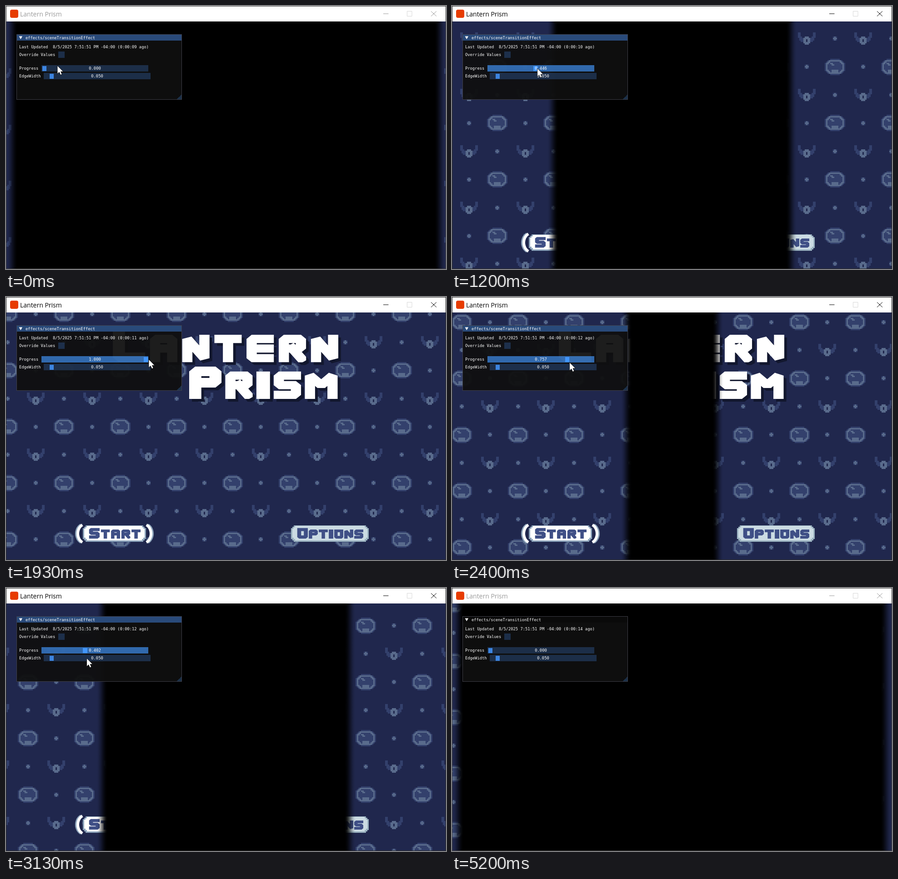
An HTML page with a canvas that plays this animation: 968 px wide and 578 px high, repeating every 5270 ms.

```html
<!DOCTYPE html>
<html lang="en">
<head>
<meta charset="utf-8">
<title>Lantern Prism</title>
<style>
  html, body { margin: 0; width: 100%; height: 100%; overflow: hidden; background: #000; }
  #stage { position: relative; width: 968px; height: 578px; overflow: hidden; background: #000; }
  #stage * { position: absolute; box-sizing: border-box; }
  #game { left: 1px; top: 34px; }
  #frame { inset: 0; border: 1px solid #2b2b2b; }
  #bar { left: 0; top: 0; width: 968px; height: 34px; background: #fff; color: #000; }
  #bar .icon { left: 9px; top: 8px; width: 18px; height: 18px; border-radius: 4px; background: #e73c00; }
  #bar .name { left: 31px; top: 8px; font: 14px/20px "Open Sans", "Noto Sans", sans-serif; white-space: pre; }
  #bar svg { left: 826px; top: 8px; fill: none; stroke: currentColor; }
  .idle #bar { color: #999; }
  .idle #frame { border-color: #444; }

  #panel { left: 23px; top: 62px; width: 364px; height: 144px; background: rgba(15, 15, 15, .94);
    border: 1px solid rgba(110, 110, 128, .5); overflow: hidden;
    font: 8.77px/14px "DejaVu Sans Mono", "Liberation Mono", monospace; color: #fff; }
  #panel span { white-space: pre; height: 14px; }
  #head { left: 0; top: 0; width: 362px; height: 13px; background: #294a7a; }
  .blur #head { background: #0a0a0a; }
  #head svg { left: 4px; top: 3px; fill: #fff; }
  .field { background: rgba(41, 74, 122, .54); height: 14px; }
  .slider { width: 235px; text-align: center; }
  .slider i { top: 1.5px; width: 9.5px; height: 11px; background: #3d85e0; }
  .slider b { left: 0; width: 100%; top: 0; font-weight: normal; }
  .drag #progress { background: rgba(66, 150, 250, .67); }
  .drag #progress i { background: #4296fa; }
  #grip { right: 0; bottom: 0; width: 10px; height: 10px;
    background: linear-gradient(135deg, transparent 50%, rgba(66, 150, 250, .25) 50%); }
  #cursor { left: 0; top: 0; overflow: visible; }
</style>
</head>
<body>
<div id="stage">
  <canvas id="game" width="966" height="543"></canvas>
  <div id="panel">
    <div id="head">
      <svg width="9" height="8"><path d="M0.5 0.5H8L4.2 7z"/></svg>
      <span style="left:19px;top:0">effects/sceneTransitionEffect</span>
    </div>
    <span id="updated" style="left:5px;top:20px"></span>
    <span style="left:5px;top:37px">Override Values</span>
    <div class="field" style="left:91px;top:37px;width:14px"></div>
    <span style="left:5px;top:67px">Progress</span>
    <div id="progress" class="field slider" style="left:54px;top:67px"><i></i><b></b></div>
    <span style="left:5px;top:84px">EdgeWidth</span>
    <div id="edge" class="field slider" style="left:59px;top:84px"><i></i><b></b></div>
    <div id="grip"></div>
  </div>
  <div id="bar">
    <div class="icon"></div>
    <div class="name">Lantern Prism</div>
    <svg width="130" height="18">
      <path d="M4 9H15.5M109 3.5L121 14.5M121 3.5L109 14.5"/>
      <path d="M56.5 3.5h10.5v11h-10.5z" stroke="#d8d8d8"/>
    </svg>
  </div>
  <div id="frame"></div>
  <svg id="cursor" width="16" height="22">
    <path d="M0 0V18.2L4.1 14.4L6.9 20.6L10.2 19.2L7.5 13.2H13z" fill="#fff" stroke="#000" stroke-width=".8"/>
  </svg>
</div>
<script>
const LOOP = 5270, STEP = 1000 / 15;
const $ = s => document.querySelector(s);
const stage = $('#stage'), updated = $('#updated'), cursor = $('#cursor');
const ctx = $('#game').getContext('2d');
ctx.translate(-1, -34);

const NAVY = '#20274d', DIM = '#33406c', PALE = '#596b8c', INK = '#3f4f86', SHADE = '#12172e';

// Paints a w by h sprite of 3px cells; shade gets the cell's offset from the centre.
function sprite(w, h, shade) {
  const c = document.createElement('canvas'), g = c.getContext('2d');
  c.width = w * 3;
  c.height = h * 3;
  for (let x = 0; x < w; x++) {
    for (let y = 0; y < h; y++) {
      g.fillStyle = shade(x - (w - 1) / 2, y - (h - 1) / 2) || 'transparent';
      g.fillRect(x * 3, y * 3, 3, 3);
    }
  }
  return c;
}

const slime = sprite(15, 12, (x, y) => {
  const r = Math.abs(x / 7.5) ** 2.5 + Math.abs(y / 6) ** 2.5;
  const ring = r > .42 && r < .74;
  const mouth = Math.abs(x) < 3 && y > 2 && y < 4;
  const glint = x > -4 && x < 0 && Math.abs(y - x / 2 + .8) < .8;
  return r < 1 && (ring || mouth || glint ? PALE : DIM);
});

const bat = sprite(13, 9, (x, y) => {
  if (x === 0 && Math.abs(y - 1.5) < 1) return NAVY;
  if (Math.hypot(x, y - 1.5) < 2.7) return PALE;
  const wing = Math.hypot(x / 6.6, (y + 2.5) / 6) < 1 && Math.hypot(x / 4.4, (y + 4) / 5) > 1;
  return wing && DIM;
});

const dot = sprite(3, 3, (x, y) => x && y ? DIM : PALE);

// Letters are thick lines through a 3 by 3 grid of nodes, numbered by rows.
const STROKES = { A: '6028,35', E: '2068,35', I: '06,28', L: '068', M: '60428', N: '6082',
  O: '402860'.slice(1) + '2', P: '60253', R: '60253,48', S: '203586', T: '02,17' };
const WIDTHS = { I: 5, M: 12 };

function glyph(ch, x, y, s, color) {
  const w = WIDTHS[ch] || 10, wide = 1.25;
  ctx.save();
  ctx.translate(x, y);
  ctx.scale(s * wide, s);
  ctx.beginPath();
  ctx.rect(0, 0, w / wide, 10);
  ctx.clip();
  ctx.beginPath();
  for (const line of STROKES[ch].split(',')) {
    [...line].forEach((n, i) =>
      ctx[i ? 'lineTo' : 'moveTo'](1.5 + n % 3 * (w / wide - 3) / 2, 1.5 + Math.floor(n / 3) * 3.5));
  }
  ctx.lineWidth = 3;
  ctx.lineCap = 'square';
  ctx.lineJoin = 'bevel';
  ctx.strokeStyle = color;
  ctx.stroke();
  ctx.restore();
  return w * s;
}

function word(text, x, bottom, u, gap, color) {
  [...text].forEach((ch, i) => {
    const s = i ? u : u * 1.18;
    x += glyph(ch, x, bottom - 10 * s, s, color) + gap;
  });
}

// Rounded box with corners stepped in 3px cells.
function pill(x, y, w, h, color) {
  ctx.fillStyle = color;
  for (let k = 0; k < 3; k++) ctx.fillRect(x + 3 * k, y + 3 * (2 - k), w - 6 * k, h - 6 * (2 - k));
}

function bracket(x, dir) {
  ctx.lineCap = 'butt';
  for (const [shift, color] of [[-2, '#8fa6bd'], [1, '#fff']]) {
    ctx.beginPath();
    ctx.ellipse(x + dir * (22 + shift), 520, 17, 21, dir > 0 ? Math.PI : 0, -1.15, 1.15);
    ctx.lineWidth = 6;
    ctx.strokeStyle = color;
    ctx.stroke();
  }
}

function button(text, x, y, w, gap, edge, face) {
  pill(x, y, w, 36, edge);
  pill(x + 3, y + 1, w - 6, 32, face);
  word(text, x + 13.5, y + 29, 2, gap, INK);
}

function pattern(t) {
  const P = 123.8, drift = t * .0377;
  const x0 = (54.6 + drift) % P - P, y0 = (212.2 + drift) % P - P;
  const put = (img, x, y) =>
    ctx.drawImage(img, Math.round(x - img.width / 2), Math.round(y - img.height / 2));
  for (let x = x0; x < 1100; x += P) {
    for (let y = y0; y < 700; y += P) {
      put(slime, x, y);
      put(bat, x + P / 2, y + P / 2);
      put(dot, x + P / 2, y);
      put(dot, x, y + P / 2);
    }
  }
}

function menu() {
  for (const [shift, color] of [[6, SHADE], [0, '#fff']]) {
    word('LANTERN', 235 + shift, 143.5 + shift, 6.04, 10.4, color);
    word('PRISM', 403 + shift, 224 + shift, 6.04, 8, color);
  }
  bracket(152, 1);
  bracket(325, -1);
  button('START', 169, 502, 139, 2.5, '#8fa6bd', '#fff');
  button('OPTIONS', 627, 502, 171, 2, '#9bb3c1', '#cbdbe3');
}

// Black closes in from both sides behind a smoothstep edge.
function curtain(p) {
  if (p >= 1) return;
  const half = 483, edge = .05 * half;
  for (const side of [1, -1]) {
    ctx.save();
    ctx.translate(side > 0 ? 1 : 967, 34);
    ctx.scale(side, 1);
    const x = p * half, g = ctx.createLinearGradient(x, 0, x + edge, 0);
    for (let k = 0; k <= 1; k += .125) g.addColorStop(k, `rgba(0,0,0,${k * k * (3 - 2 * k)})`);
    ctx.fillStyle = g;
    ctx.fillRect(x, 0, half - x, 543);
    ctx.restore();
  }
}

// Slider drag: grab, pull to the end, hold, draw back, let go.
const GRAB = 730, TURN = 1940, DROP = 3870;
const DRAG = [[GRAB, 0], [1200, .446], [1800, 1], [TURN, 1], [2400, .757], [3133, .402], [DROP, 0]];

function progress(t) {
  const i = DRAG.findIndex(k => k[0] > t);
  if (i < 1) return 0;
  const [t0, p0] = DRAG[i - 1], [t1, p1] = DRAG[i];
  return p0 + (p1 - p0) * (t - t0) / (t1 - t0);
}

function pointer(t, p) {
  const approach = Math.max(0, 1 - t / 470);
  return [
    86 + 27 * approach + 228 * p - .15 * Math.max(0, t - DROP),
    137 - 6 * approach + .0145 * Math.max(0, t - TURN)
  ];
}

function setSlider(id, v) {
  $(id + ' i').style.left = 1.5 + v * 223.5 + 'px';
  $(id + ' b').textContent = v.toFixed(3);
}
setSlider('#edge', .05);

function render(t) {
  const p = progress(t), [x, y] = pointer(t, p);
  ctx.fillStyle = NAVY;
  ctx.fillRect(0, 34, 968, 544);
  pattern(t);
  menu();
  curtain(progress(t - 16)); // the effect trails the slider by one tick

  const secs = String(9 + Math.floor((t + 700) / 1000)).padStart(2, '0');
  updated.textContent = `Last Updated  8/5/2025 7:51:51 PM -04:00 (0:00:${secs} ago)`;
  setSlider('#progress', p);
  stage.classList.toggle('idle', t < 690 || t > 4450);
  stage.classList.toggle('blur', t > 4450);
  stage.classList.toggle('drag', t > 690 && t < 3920);
  cursor.style.transform = `translate(${x}px, ${y}px)`;
}

const start = performance.now();
function tick() {
  const t = (performance.now() - start) % LOOP;
  render(Math.floor((t + 4) / STEP) * STEP);
  requestAnimationFrame(tick);
}
tick();
</script>
</body>
</html>
```
